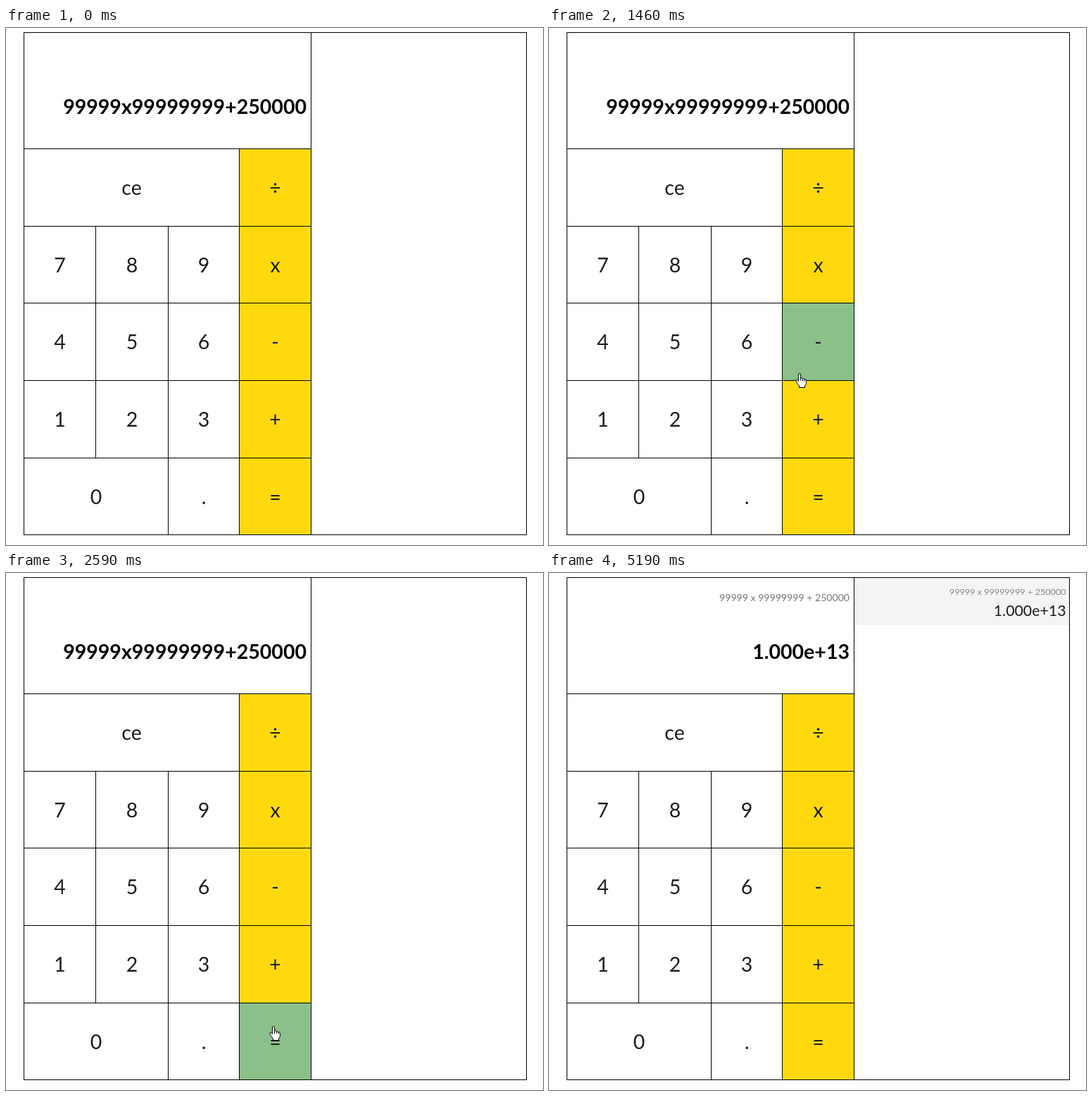
Write an HTML page with a canvas that moves like this. It is 763 by 734 pixels and loops after 6250 ms.

```html
<!DOCTYPE html>
<html lang="en">
<head>
<meta charset="utf-8">
<title>Calculator</title>
<style>
html, body { margin: 0; width: 100%; height: 100%; overflow: hidden; background: #fff; }
canvas { display: block; }
</style>
</head>
<body>
<canvas id="stage" width="763" height="734"></canvas>
<script>
const ctx = document.getElementById('stage').getContext('2d');
const LOOP = 6250, TICK = 66.6, RESULT_TICK = 50;
const INK = '#1c1c1c', LINE = '#000', YELLOW = '#ffd90e', GREEN = '#8bc08a';
const SUM = '99999 x 99999999 + 250000', RESULT = '1.000e+13';

const COLS = [25, 127, 230, 331, 433];
const rowTop = row => Math.round(171.2 + 109.6 * row);

// A repeated label is one wide key.
const LAYOUT = ['ce ce ce ÷', '7 8 9 x', '4 5 6 -', '1 2 3 +', '0 0 . ='];
const KEYS = LAYOUT.flatMap((line, row) => {
  const labels = line.split(' ');
  return [...new Set(labels)].map(label => {
    const x = COLS[labels.indexOf(label)], y = rowTop(row);
    return {
      label, x, y,
      w: COLS[labels.lastIndexOf(label) + 1] - x,
      h: rowTop(row + 1) - y,
      fill: label === labels[3] ? YELLOW : '#fff'
    };
  });
});

// Pointer stops; a move fills the time since the last stop unless `ticks` is given.
const STOPS = [
  { at: 2, x: 701, y: 713 },
  { at: 11, x: 433, y: 258 },
  { at: 16, x: 285, y: 234 },
  { at: 19, x: 272, y: 275 },
  { at: 22, x: 356, y: 490 },
  { at: 25, x: 375, y: 640 },
  { at: 27, x: 300, y: 590 },
  { at: 31, x: 243, y: 481 },
  { at: 35, x: 345, y: 425 },
  { at: 39, x: 380, y: 643 },
  { at: 52, x: 377, y: 643, ticks: 3 },
  { at: 71, x: 379, y: 645, ticks: 1 },
  { at: 77, x: 436, y: 701, ticks: 3 }
];

// Both shapes have their hot spot at 0,0.
const HAND = new Path2D('M-1.6 11.5V2Q-1.4 .5 0 .5Q1.4 .5 1.6 2V7Q3.8 6.2 4.4 7.9' +
  'Q6.5 7.1 7 8.9Q9.3 8.3 9.4 10.6V14.5Q9.2 16 7.5 18V20.5H-.5V18' +
  'Q-2.6 16 -4.6 12.2Q-5.6 10 -4.6 9.4Q-3.4 8.8 -1.6 11.5Z');
const KNUCKLES = new Path2D('M1.6 7V11M4.4 8V11.2M7 9V11.5');
const ARROW = new Path2D('M.5 .5V16L4 12.7L6.5 18.5L8.8 17.5L6.3 11.8H11Z');

function pointerAt(tick) {
  const next = STOPS.findIndex(stop => stop.at >= tick);
  if (tick < STOPS[0].at || next < 0) return null;
  const to = STOPS[next], from = STOPS[next - 1] || to;
  const ticks = to.ticks || to.at - from.at || 1;
  const k = Math.max(0, 1 - (to.at - tick) / ticks);
  const mix = axis => Math.round(from[axis] + (to[axis] - from[axis]) * k);
  return { x: mix('x'), y: mix('y') };
}

function rect(x, y, w, h, color) {
  ctx.fillStyle = color;
  ctx.fillRect(x, y, w, h);
}

function frame(x, y, w, h) {
  ctx.strokeStyle = LINE;
  ctx.lineWidth = 1;
  ctx.strokeRect(x + 0.5, y + 0.5, w, h);
}

function text(str, x, y, size, { weight = 400, color = INK, align = 'right' } = {}) {
  ctx.font = `${weight} ${size}px Lato, sans-serif`;
  ctx.textAlign = align;
  ctx.fillStyle = color;
  ctx.fillText(str, x, y);
}

function drawKey({ label, x, y, w, h, fill }, pointer) {
  const hovered = pointer && pointer.x > x && pointer.x < x + w &&
    pointer.y > y && pointer.y <= y + h;
  rect(x, y, w, h, hovered ? GREEN : fill);
  frame(x, y, w, h);
  text(label, x + w / 2 + 0.5, Math.round(y + h / 2 + 11), 28.5, { align: 'center' });
}

function drawPointer({ x, y }) {
  const hand = x < COLS[4];
  const shape = hand ? HAND : ARROW;
  ctx.save();
  ctx.translate(x, y);
  ctx.fillStyle = '#fff';
  ctx.strokeStyle = LINE;
  ctx.lineWidth = 1;
  ctx.fill(shape);
  ctx.stroke(shape);
  if (hand) ctx.stroke(KNUCKLES);
  ctx.restore();
}

function draw(time) {
  const tick = Math.floor((time % LOOP + 15) / TICK);
  const pointer = pointerAt(tick);
  const solved = tick >= RESULT_TICK;

  rect(0, 0, 763, 734, '#fff');
  if (solved) {
    rect(433, 7, 306, 67, '#f4f4f4');
    text(SUM, 734.5, 31, 12.6, { weight: 300, color: '#333' });
    text(RESULT, 734.5, 61, 21.3);
    text(SUM, 427, 40, 14.1, { color: '#777' });
  }
  const display = solved ? RESULT : SUM.replaceAll(' ', '');
  text(display, 427, 122, 28.54, { weight: 700, color: '#000' });

  KEYS.forEach(key => drawKey(key, pointer));
  frame(25, 6, 408, 165);
  frame(433, 6, 306, 713);
  if (pointer) drawPointer(pointer);
}

function loop() {
  draw(performance.now());
  requestAnimationFrame(loop);
}
loop();
</script>
</body>
</html>
```
